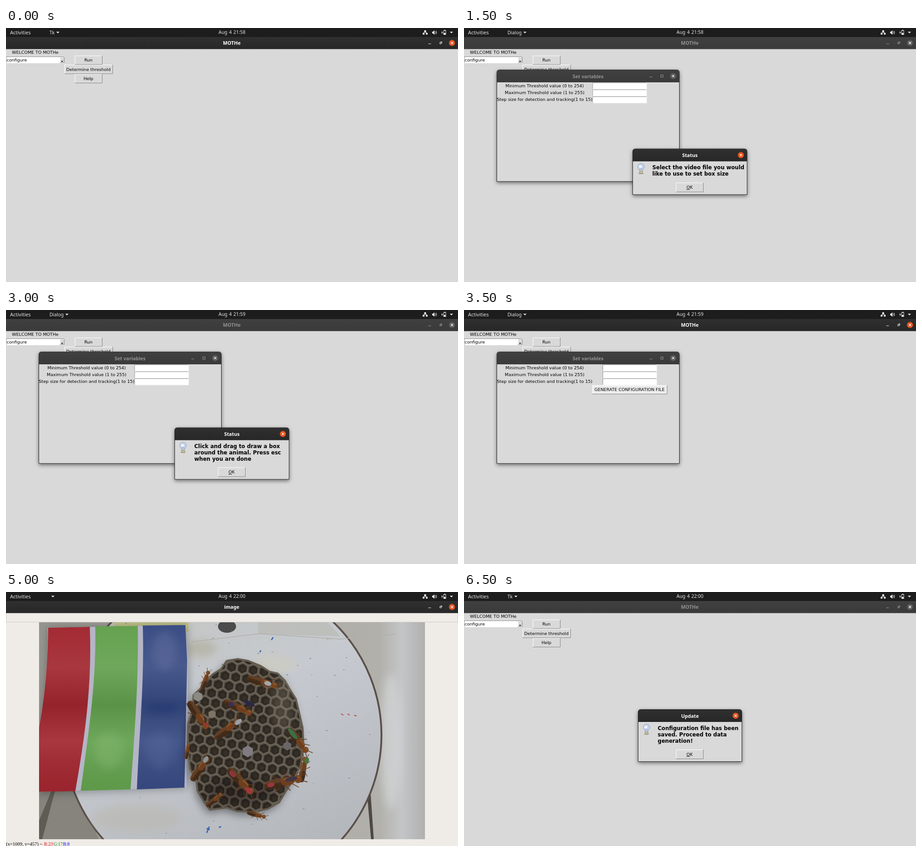
These frames come from a looping animation (998 by 561 pixels, 7000 ms). An HTML page:

```html
<!DOCTYPE html>
<html lang="en">
<head>
<meta charset="utf-8">
<title>MOTHe configuration</title>
<style>
html, body { margin: 0; width: 100%; height: 100%; overflow: hidden; background: #d9d9d9; }
svg { display: block; }
#stage { position: absolute; left: 0; top: 0; }
text { font: 9.5px "DejaVu Sans", sans-serif; fill: #000; white-space: pre; }
.bar { font: 10.4px "Noto Sans", sans-serif; fill: #e6e6e6; }
.title { font: bold 10.7px "Noto Sans", sans-serif; }
.msg { font: bold 11.69px "DejaVu Sans", sans-serif; }
.pix { font: 10.1px "Liberation Serif", serif; }
.u { text-decoration: underline; }
.scene { visibility: hidden; animation: show 7s step-end infinite; }
@keyframes show { 0% { visibility: visible; } 7.143%, 100% { visibility: hidden; } }
</style>
</head>
<body>
<svg id="stage" width="998" height="561" viewBox="0 0 998 561">
<defs>
  <filter id="shadow" x="-20%" y="-20%" width="140%" height="140%">
    <feDropShadow dx="0" dy="3" stdDeviation="4.5" flood-opacity=".5"/>
  </filter>
  <filter id="soft" x="-50%" y="-50%" width="200%" height="200%"><feGaussianBlur stdDeviation="9"/></filter>
  <linearGradient id="on" x2="0" y2="1"><stop stop-color="#303030"/><stop offset="1" stop-color="#272727"/></linearGradient>
  <linearGradient id="off" x2="0" y2="1"><stop stop-color="#404040"/><stop offset="1" stop-color="#3a3a3a"/></linearGradient>
  <linearGradient id="table"><stop stop-color="#96958f"/><stop offset=".5" stop-color="#a9a8a2"/><stop offset=".88" stop-color="#b1b0ab"/><stop offset=".94" stop-color="#c4c5c7"/><stop offset="1" stop-color="#b0b0ae"/></linearGradient>
  <linearGradient id="disc" x2=".4" y2="1"><stop stop-color="#c3c3bb"/><stop offset=".5" stop-color="#c6cad0"/><stop offset="1" stop-color="#b4b7bc"/></linearGradient>
  <linearGradient id="sheen" x2="0" y2="1">
    <stop stop-color="#fff" stop-opacity=".02"/><stop offset=".25" stop-color="#fff" stop-opacity=".08"/>
    <stop offset=".48" stop-color="#000" stop-opacity=".08"/><stop offset=".7" stop-color="#fff" stop-opacity=".08"/>
    <stop offset="1" stop-color="#000" stop-opacity=".04"/>
  </linearGradient>
  <pattern id="cells" width="24" height="42" patternUnits="userSpaceOnUse" patternTransform="rotate(8)"></pattern>
  <g id="photo"></g>
</defs>
</svg>
<script>
const stage = document.getElementById('stage');
const $ = id => document.getElementById(id);

const rect = (x, y, w, h, fill, extra = '') => `<rect x="${x}" y="${y}" width="${w}" height="${h}" fill="${fill}" ${extra}/>`;
const text = (x, y, s, extra = '') => `<text x="${x}" y="${y}" ${extra}>${s}</text>`;
const mid = (x, y, s, extra = '') => text(x, y, s, 'text-anchor="middle" ' + extra);
const path = (d, fill, extra = '') => `<path d="${d}" fill="${fill}" ${extra}/>`;
const line = (d, color, width = 1) => path(d, 'none', `stroke="${color}" stroke-width="${width}"`);
const oval = (x, y, rx, ry, fill, extra = '') => `<ellipse cx="${x}" cy="${y}" rx="${rx}" ry="${ry}" fill="${fill}" ${extra}/>`;
const blur = (x, y, rx, ry, fill, opacity = 1) => oval(x, y, rx, ry, fill, `filter="url(#soft)" opacity="${opacity}"`);
const key = s => s.replace(/_(.)/, '<tspan class="u">$1</tspan>');
const down = (x, y, w, fill) => path(`M${x - w} ${y - w / 2}h${2 * w}l${-w} ${w}z`, fill);

// Tk bevels
const bevel = (x, y, w, h, fill, light, dark) => rect(x, y, w, h, fill) +
  line(`M${x + .5} ${y + h}V${y + .5}H${x + w}`, light) + line(`M${x} ${y + h - .5}H${x + w - .5}V${y}`, dark);
const raised = (x, y, w, h, fill = '#d9d9d9') => bevel(x, y, w, h, fill, '#fff', '#858585');
const sunken = (x, y, w, h, fill = '#fff') => bevel(x, y, w, h, fill, '#8c8c8c', '#f4f4f4');
const button = (x, y, w, h, label, fill) => raised(x, y, w, h, fill) + mid(x + w / 2 - .5, y + h / 2 + 3.3, key(label));

function controls(x, y, focus, kinds) {
  const ink = focus ? '#eee' : '#9a9a9a';
  return [...kinds].map((kind, i) => {
    const cx = x - (kinds.length - 1 - i) * 24.8;
    if (kind == '-') return rect(cx - 2.7, y + 1.4, 6, 1, ink);
    if (kind == 'o') return rect(cx - 2.5, y - 2.5, 5, 5, 'none', `stroke="${ink}"`);
    if (kind == 'r') return rect(cx - 2, y - 1, 3, 3, 'none', `stroke="${ink}"`) + line(`M${cx - .5} ${y - 2.5}h3v3`, ink);
    return oval(cx, y, 6.8, 6.8, focus ? '#e2521d' : '#5a5a5a') +
      line(`M${cx - 2.5} ${y - 2.5}l5 5m0-5l-5 5`, '#fff', 1.2);
  }).join('');
}

function frame(x, y, w, h, title, focus, kinds = 'x', fill = '#d9d9d9') {
  const top = `M${x} ${y + 27.5}v-21.5q0-6 6-6h${w - 12}q6 0 6 6v21.5z`;
  return path(`M${x} ${y + h}v${6 - h}q0-6 6-6h${w - 12}q6 0 6 6v${h - 6}z`, fill, 'stroke="#222" filter="url(#shadow)"') +
    path(top, `url(#${focus ? 'on' : 'off'})`) +
    mid(x + w / 2, y + 18, title, `class="title" style="fill:${focus ? '#fff' : '#929292'}"`) +
    controls(x + w - 13.7, y + 13.7, focus, kinds);
}

function topBar(clock, menu) {
  const arrow = { Tk: 114.5, Dialog: 134.5, '': 103.5 }[menu];
  const ink = '#eee';
  return rect(0, 0, 998, 20, '#1d1d1d') + text(9, 13.7, 'Activities', 'class="bar" style="font-size:11px"') +
    text(96, 13.7, menu, 'class="bar"') + down(arrow, 10, 3.6, ink) +
    mid(499, 13.3, 'Aug 4 ' + clock, 'class="bar" word-spacing="1"') +
    rect(923.5, 5, 4, 4, ink) + rect(920, 11, 4, 3.5, ink) + rect(927, 11, 4, 3.5, ink) + line('M925.5 8v2M922 11.500v-1.500h7v1.500', ink) +
    path('M941 8h2l3-3v10l-3-3h-2z', ink) + line('M947.500 7.500q2 2 0 5M949 6q3.500 4 0 8', ink) +
    path('M963.500 6l-2.500 4.500h2l-.5 3.500 2.500-4.500h-2z', ink) + rect(966.5, 5.5, 4.5, 9, 'none', `stroke="${ink}"`) +
    rect(967.5, 4, 2.5, 1.5, ink) + rect(967, 11, 3.5, 3, ink) + down(983.5, 10, 3.6, ink);
}

const titleBar = (name, focus) => rect(0, 20, 998, 26.6, `url(#${focus ? 'on' : 'off'})`) +
  mid(498.5, 37.3, name, `class="title" style="fill:${focus ? '#fff' : '#929292'}"`) + controls(984.7, 33, focus, '-rx');

const mainWindow = focus => rect(0, 46, 998, 515, '#d9d9d9') + titleBar('MOTHe', focus) +
  mid(64.5, 57, 'WELCOME TO MOTHe') + sunken(0, 63, 129, 15) + text(1.5, 74, 'configure') +
  raised(119, 64, 10, 13) + down(123.8, 74, 2.5, '#000') +
  button(152, 61, 61, 20, 'Run') + button(129, 81, 107, 20.5, 'Determine threshold') + button(152, 102, 61, 20, 'Help');

function variables(focus, ready) {
  const labels = ['Minimum Threshold value (0 to 254)', 'Maximum Threshold value (1 to 255)', 'Step size for detection and tracking(1 to 15)'];
  return frame(72.5, 92.5, 403, 246.5, 'Set variables', focus, '-ox') +
    labels.map((s, i) => mid(178, 130.6 + i * 15.3, s) + sunken(ready ? 306 : 283.5, 120.5 + i * 15.3, 120, 15)).join('') +
    (ready ? button(283, 166, 166, 20, 'GENERATE CONFIGURATION FILE', '#ececec') : '');
}

const bulb = (x, y) => oval(x, y + 10, 6, 2, '#0003') + rect(x - 3, y + 3, 6, 8, '#c9c08b', 'rx="2" stroke="#77745f" stroke-width=".7"') +
  path(`M${x - 3} ${y + 5}q0-3-2.500-5a7.200 7.200 0 1 1 11 0q-2.500 2-2.500 5z`, '#c3d3ee', 'stroke="#8792a5" stroke-width=".8"') +
  oval(x - 1.5, y - 5, 3.5, 3, '#eef4ff') + line(`M${x - 2} ${y + 4}v-5l2 2 2-2v5`, '#8d97a8', .7);

const message = (x, y, w, h, title, lines) => frame(x, y, w, h, title, true) + bulb(x + 18.5, y + 44) +
  lines.map((s, i) => text(x + 43.3, y + 45 + i * 14, s, 'class="msg"')).join('') + button(468, y + h - 26.5, 61, 21, '_OK');

const folder = (x, y) => path(`M${x} ${y + 10}v-9h4.500l1 1.500h5.500v7.500z`, '#4b74a8', 'stroke="#36506f" stroke-width=".6"') + rect(x + .8, y + 4, 9.6, 5.6, '#83abdc');
const sheet = (x, y) => rect(x + .5, y, 9, 10.5, '#f3f3f3', 'stroke="#858585" stroke-width=".8"') + line(`M${x + 2} ${y + 3}h6m-6 2.300h6m-6 2.300h6`, '#aaa', .8);
const knob = (x, y) => raised(x, y, 11, 4.5);

function chooser({ title, files, label, value, action, types }) {
  const items = files.map((name, i) => {
    const x = i < 6 ? 353 : 469, y = 272.5 + (i % 6) * 13.85;
    return (/^\.git$|shots$/.test(name) ? folder : sheet)(x, y) + text(x + 14.7, y + 8.7, name);
  }).join('');
  return frame(346.5, 210, 305, 215, title, true) +
    text(350.5, 255.7, key('_Directory:')) + raised(404, 240, 214, 25) + text(413, 255.7, '/home/marusel/MOTHE-GUI') + knob(603, 250) +
    raised(624, 240, 24, 25) + folder(629, 247) + path('M637 259v-5h-2.500l4.500-5 4.500 5h-2.500v5z', '#7cc142', 'stroke="#3d7a18" stroke-width=".7"') +
    sunken(350, 268, 298, 104) + items + sunken(351, 360, 296, 11, '#c3c3c3') + raised(352, 361, 294, 9) +
    line('M360.500 361v9M638.500 361v9', '#a5a5a5') + line('M357.500 363.500l-2.500 2 2.500 2M641 363.500l2.500 2-2.500 2', '#a0a0a0') +
    text(413, 391.3, key(label), 'text-anchor="end"') + sunken(417, 380, 167, 17) + text(419.3, 391.3, value) +
    button(587, 378, 61, 21, action) + button(587, 401, 61, 20.5, '_Cancel') +
    (types ? text(350.5, 414.2, key('Files of _type:'), 'style="fill:#a3a3a3"') + raised(417, 401, 167, 20) + knob(569, 409) : '');
}

const picture = (x, y, w, h, box = '73 67 852 479') =>
  `<svg x="${x}" y="${y}" width="${w}" height="${h}" viewBox="${box}" preserveAspectRatio="none"><use href="#photo"/></svg>`;

function pixelInfo(x, y, [px, py, r, g, b]) {
  const wide = String(r).length > 2 ? 5.2 : 0;
  return text(x, y, `(x=${px}, y=${py}) ~`, 'class="pix" style="font-size:10.6px"') +
    text(x + 84, y, 'R:' + r, 'class="pix" style="fill:#e00"') +
    text(x + 105 + wide, y, 'G:' + g, 'class="pix" style="fill:#080"') +
    text(x + 126 + wide * 2, y, 'B:' + b, 'class="pix" style="fill:#00e"');
}

const imageFull = (focus, info) => rect(0, 46, 998, 515, '#efebe7') + titleBar('image', focus) +
  line('M.5 47V66.500H997.500V47', '#cfcac5') + picture(73, 67, 852, 479) + pixelInfo(0, 560, info);
const imageSmall = () => frame(105.5, 125.5, 619, 409.5, 'image', true, '-ox', '#efebe7') +
  line('M106 172.500h618', '#cfcac5') + picture(108, 173, 613, 345);
const roiMark = rect(504, 150.5, 120, 103, 'none', 'stroke="#0f0" stroke-width="1.5"');
const roiWindow = frame(105.5, 125.5, 271, 231.5, 'ROI', true, '-x', '#efebe7') +
  line('M106 172.500h270', '#d3cec9') + picture(142, 173, 198, 169.5, '504.8 151.300 118.400 101.400');

// Honeycomb and photo
const hex = (x, y, r, fill) => path('M' + [...Array(6)].map((_, i) => {
  const a = (i + .5) * Math.PI / 3;
  return `${(x + r * Math.cos(a)).toFixed(1)} ${(y + r * Math.sin(a)).toFixed(1)}`;
}).join('L') + 'z', fill);
$('cells').innerHTML = rect(0, 0, 24, 42, '#6a6357') + [[12, 10.5], [0, 31.5], [24, 31.5]]
  .map(([x, y]) => hex(x, y, 12.3, '#4f483e') + hex(x + .6, y + .4, 10.3, '#2c2721') + oval(x + 1.5, y + 1.5, 5, 5.5, '#352f27')).join('');

let seed = 7;
const random = () => (seed = seed * 16807 % 2147483647) / 2147483647;

const wasp = ([x, y, turn, size, ...marks]) => `<g transform="translate(${x} ${y}) rotate(${turn}) scale(${size / 70})">` +
  line('M-5-5l-12-10M2-6l8-12M14-5l12-10M-5 5l-12 10M2 6l8 12M14 5l12 10M32-3l12-6M32 3l12 6', '#63391b', 1.4) +
  oval(-19, 0, 17, 8, '#4f3019') + line('M-27-6v12m7-13v14m7-13v12', '#332213', 1.5) +
  oval(-13, -5, 22, 4, '#66432a', 'opacity=".8"') + oval(-13, 5, 22, 4, '#402a1a', 'opacity=".8"') +
  oval(9, 0, 13, 8, '#6e3f1e') + oval(28, 0, 7, 7.5, '#784520') + line('M2-4q8-3 14 0M25-3h6', '#95602f', 2) + '</g>' +
  marks.map(([mx, my, rx, color]) => oval(mx, my, rx, 5, color, `transform="rotate(${turn} ${mx} ${my})"`)).join('');
const wasps = [
  [566, 199, 15, 68, [578, 202, 8, '#a0a5b0']], [424, 272, 55, 72, [440, 293, 4, '#963630']],
  [512, 255, 25, 66, [497, 248, 6, '#35315a'], [537, 246, 13, '#2a2845']], [488, 303, -38, 66, [513, 287, 9, '#9aa0a8']],
  [645, 328, 52, 66, [633, 313, 15, '#3a7044']], [656, 392, -80, 56, [664, 372, 7, '#44753f']],
  [428, 391, -55, 62, [441, 370, 8, '#8f9190']], [518, 418, 45, 76, [500, 402, 9, '#8a363a'], [535, 438, 9, '#a23440']],
  [612, 420, -12, 84, [585, 426, 8, '#963640'], [630, 413, 14, '#423540']], [440, 195, -70, 44],
  [460, 459, -40, 44], [400, 352, -80, 34], [553, 492, 15, 42]
];
const red = 'M93 79L185 77C190 200 176 310 153 440L73 441V300C88 220 92 150 93 79z';
const green = 'M197 76L291 75C293 200 284 310 275 436L165 439C182 310 200 200 197 76z';
const blue = 'M302 74L396 73L400 150L394 432L289 436C294 310 306 200 302 74z';
const nest = 'M487 152L512 148L535 152L562 163L582 176L600 180L616 196L625 212L640 236L647 265L655 300L657 345L650 385L634 415L618 440L603 465L578 479L545 486L510 484L488 476L450 481L438 465L423 440L420 415L407 392L401 350L402 290L412 262L414 228L436 207L456 182L475 170z';
const specks = [...Array(60)].map(() => {
  const a = random() * 6.28, r = 150 + 190 * random();
  const color = ['#8a7c58', '#6b604e', '#5a689f', '#a99b72'][Math.floor(random() * 4)];
  return oval((478 + r * Math.cos(a)).toFixed(), (315 + r * Math.sin(a)).toFixed(), 1 + random() * 1.6, 1, color, 'opacity=".6"');
}).join('');

$('photo').innerHTML = rect(73, 67, 852, 479, 'url(#table)') +
  path('M73 440H160L205 546H73z', '#86847d') + path('M73 505L100 440H108L80 546H73z', '#5f5c56') + path('M798 455L806 546H812L804 430z', '#4c4842') +
  blur(850, 330, 24, 150, '#dcdee0', .5) +
  oval(478, 316, 351, 348, 'url(#disc)', 'stroke="#5b504a" stroke-width="4"') +
  blur(590, 160, 50, 18, '#cfcdbb', .6) + blur(430, 125, 35, 18, '#aaa58c', .5) + blur(290, 500, 100, 32, '#bab7ad', .5) +
  path('M557 67H710L738 98L557 93z', '#b5b5ad', 'opacity=".5"') + line('M410 110L560 92L735 104L862 93', '#b0b0a8', 1.5) +
  oval(488, 76, 20, 14, '#4a4b4a') + path('M235 67H403V88L240 75z', '#c3c28c') + specks +
  line('M586 106l4-6M560 133l3-4M443 532l6-14m-6 4l7 3M470 520l5-2', '#3561a6', 2.5) +
  line('M740 269l5 3m9-3l5 3m10 0l5 2', '#b64a49', 2) +
  path('M92 79L400 72L406 250L402 434L73 447V300C88 220 92 150 92 79z', '#0004', 'filter="url(#soft)"') +
  path('M92 79L396 73L402 150L399 432L73 441V300C88 220 92 150 92 79z', '#b4b5c6') +
  path(red, '#a1262f') + path(green, '#62a04d') + path(blue, '#374a82') + path(red + green + blue, 'url(#sheen)') +
  blur(350, 130, 28, 42, '#6872a0', .45) + blur(345, 258, 38, 12, '#1c356f', .5) + blur(340, 350, 30, 40, '#5b6c9c', .35) +
  blur(228, 350, 32, 40, '#82b56f', .5) +
  path(nest, '#0006', 'filter="url(#soft)" transform="translate(-5 8)"') +
  path(nest, 'url(#cells)', 'stroke="#655d51" stroke-width="4" stroke-linejoin="round"') +
  blur(515, 440, 75, 30, '#14100c', .35) + blur(610, 250, 22, 60, '#8a8172', .3) +
  hex(534, 352, 13, '#7f7b80') + hex(424, 231, 11, '#8d8a83') + hex(455, 270, 9, '#7d7463') + hex(621, 340, 10, '#6a6665') +
  wasps.map(wasp).join('');

// One scene per half second
const files = ['.git', 'gui_screenshots', 'bb_model_N12.h5py', 'mothe_gui.py', 'README.md', 'requirement.txt', 'wasp_model.h5py', 'wasp_original.MTS'];
const openFile = value => chooser({ title: 'Open', files, label: 'File _name:', value, action: '_Open', types: true });
const pickFolder = chooser({ title: 'Choose Directory', files: files.slice(0, 2), label: '_Selection:', value: '/home/marusel/MOTHE-GUI', action: '_OK' });
const askVideo = message(372.5, 267, 252.5, 101, 'Status', ['Select the video file you would', 'like to use to set box size']);
const askBox = message(372.5, 260, 252.5, 114, 'Status', ['Click and drag to draw a box', 'around the animal. Press esc', 'when you are done']);
const saved = message(384.5, 259.5, 229, 115, 'Update', ['Configuration file has been', 'saved. Proceed to data', 'generation!']);
const desk = mainWindow(false), vars = desk + variables(false);

const scenes = [
  ['21:58', 'Tk', mainWindow(true)],
  ['21:58', 'Dialog', desk + pickFolder],
  ['21:58', 'Dialog', desk + variables(true)],
  ['21:58', 'Dialog', vars + askVideo],
  ['21:58', 'Dialog', vars + openFile('')],
  ['21:59', 'Dialog', vars + openFile('wasp_original.MTS')],
  ['21:59', 'Dialog', vars + askBox],
  ['21:59', 'Dialog', mainWindow(true) + variables(false, true)],
  ['21:59', '', desk + variables(false, true) + imageSmall()],
  ['22:00', '', desk + variables(false, true) + imageSmall()],
  ['22:00', '', imageFull(true, [1009, 457, 23, 17, 8])],
  ['22:00', '', imageFull(true, [1242, 421, 52, 46, 39]) + roiMark],
  ['22:00', '', imageFull(false, [1391, 276, 208, 216, 221]) + roiMark + roiWindow],
  ['22:00', 'Tk', desk + saved]
];
stage.insertAdjacentHTML('beforeend', scenes.map(([clock, menu, body], i) =>
  `<g class="scene" style="animation-delay:${i * 500}ms">${body}${topBar(clock, menu)}</g>`).join(''));
</script>
</body>
</html>
```
